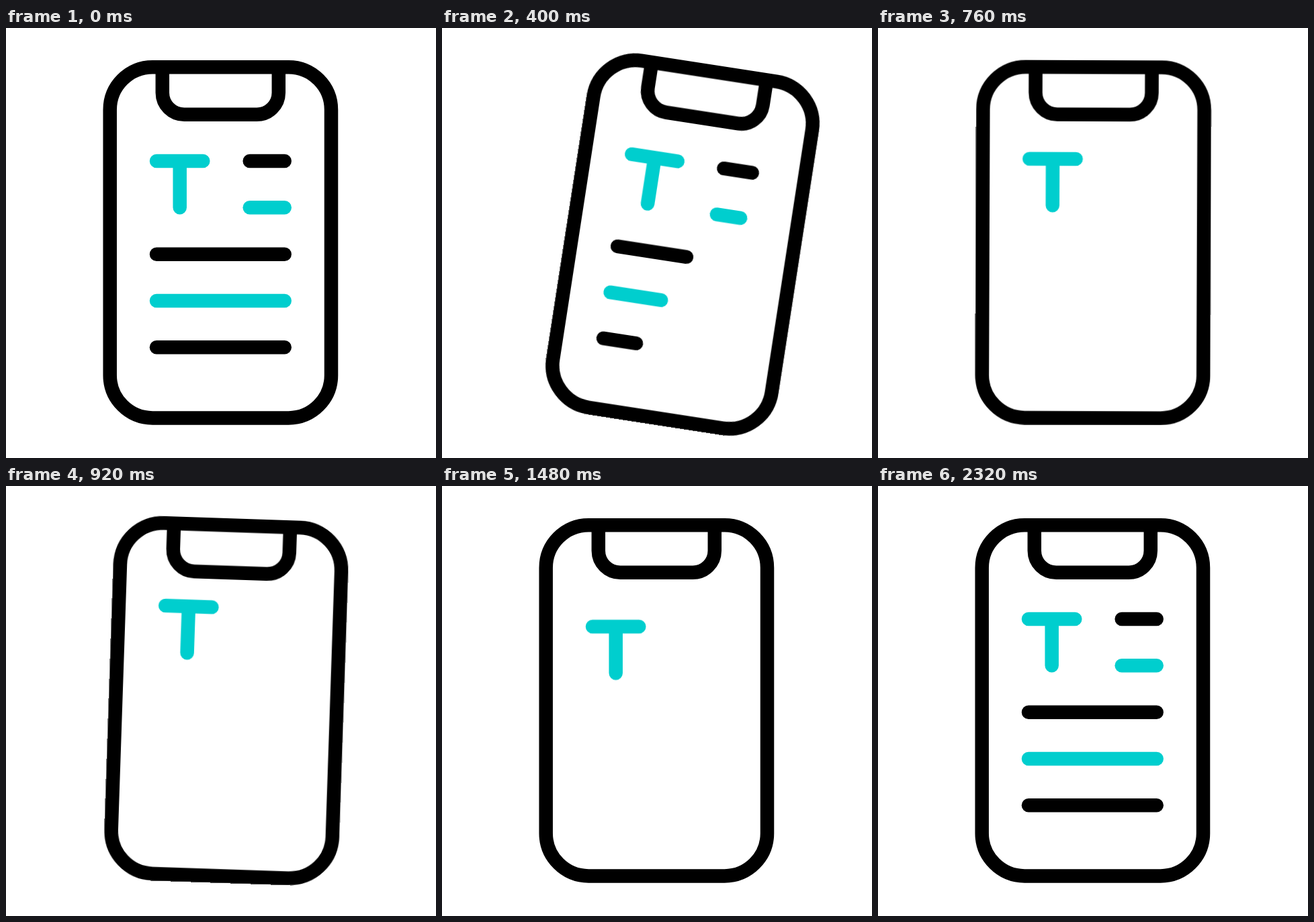
These frames come from a looping animation (640 by 640 pixels, 2880 ms). An HTML page:

```html
<!DOCTYPE html>
<html lang="en">
<head>
<meta charset="utf-8">
<title>Phone text</title>
<style>
  html, body { margin: 0; height: 100%; overflow: hidden; background: #fff; }
  svg { display: block; width: 100vw; height: 100vh; }
  path, rect { fill: none; stroke: #000; stroke-width: 20.5; }
  .teal { stroke: #00cece; }
  .bar, .letter { stroke-linecap: round; }

  .phone, .letter, .bar { animation: 2880ms infinite both; }
  .phone, .letter { animation-timing-function: cubic-bezier(.333, 0, .667, 1); }
  .phone { animation-name: shake; transform-origin: 319.4px 573px; }
  .letter { animation-name: bounce; }
  .bar { stroke-dasharray: 1 2; animation-timing-function: cubic-bezier(.167, 0, .833, 1); }
  .b1 { animation-name: bar1; }
  .b2 { animation-name: bar2; }
  .b3 { animation-name: bar3; }
  .b4 { animation-name: bar4; }
  .b5 { animation-name: bar5; }

  @keyframes shake {
    0% { transform: rotate(0deg); }
    7.29% { transform: rotate(-6deg); }
    15.28% { transform: rotate(10deg); }
    22.22% { transform: rotate(-5.1deg); }
    29.17% { transform: rotate(3deg); }
    36.11%, 100% { transform: rotate(0deg); }
  }
  @keyframes bounce {
    0%, 23.61% { transform: translateY(0); }
    36.01% { transform: translateY(-22.6px); }
    48.44% { transform: translateY(15px); }
    60.83% { transform: translateY(-10.5px); }
    73.26%, 100% { transform: translateY(0); }
  }

  /* each bar retracts to its left end, hides, then grows back */
  @keyframes bar1 {
    0%, 11.35% { stroke-dashoffset: 0; visibility: visible; }
    22.92%, 51.56% { stroke-dashoffset: 1; visibility: hidden; }
    63.13%, 100% { stroke-dashoffset: 0; visibility: visible; }
  }
  @keyframes bar2 {
    0%, 9.97% { stroke-dashoffset: 0; visibility: visible; }
    21.53%, 55.73% { stroke-dashoffset: 1; visibility: hidden; }
    67.29%, 100% { stroke-dashoffset: 0; visibility: visible; }
  }
  @keyframes bar3 {
    0%, 8.58% { stroke-dashoffset: 0; visibility: visible; }
    20.14%, 59.9% { stroke-dashoffset: 1; visibility: hidden; }
    71.46%, 100% { stroke-dashoffset: 0; visibility: visible; }
  }
  @keyframes bar4 {
    0%, 7.19% { stroke-dashoffset: 0; visibility: visible; }
    18.75%, 64.06% { stroke-dashoffset: 1; visibility: hidden; }
    75.63%, 100% { stroke-dashoffset: 0; visibility: visible; }
  }
  @keyframes bar5 {
    0%, 5.8% { stroke-dashoffset: 0; visibility: visible; }
    17.36%, 68.23% { stroke-dashoffset: 1; visibility: hidden; }
    79.79%, 100% { stroke-dashoffset: 0; visibility: visible; }
  }
</style>
</head>
<body>
<svg viewBox="0 0 640 640">
  <g class="phone">
    <rect x="154.7" y="58.2" width="329.3" height="522.2" rx="63.5"/>
    <path d="M232.8 58.2V96.2A32.5 32.5 0 0 0 265.3 128.7H373.3A32.5 32.5 0 0 0 405.8 96.2V58.2"/>
    <path class="letter teal" d="M224 198H293.3M258.7 198V267.3"/>
    <path class="bar b1" pathLength="1" d="M362.7 198H414.7"/>
    <path class="bar b2 teal" pathLength="1" d="M362.7 267.3H414.7"/>
    <path class="bar b3" pathLength="1" d="M224 336.7H414.7"/>
    <path class="bar b4 teal" pathLength="1" d="M224 406H414.7"/>
    <path class="bar b5" pathLength="1" d="M224 475.3H414.7"/>
  </g>
</svg>
</body>
</html>
```
